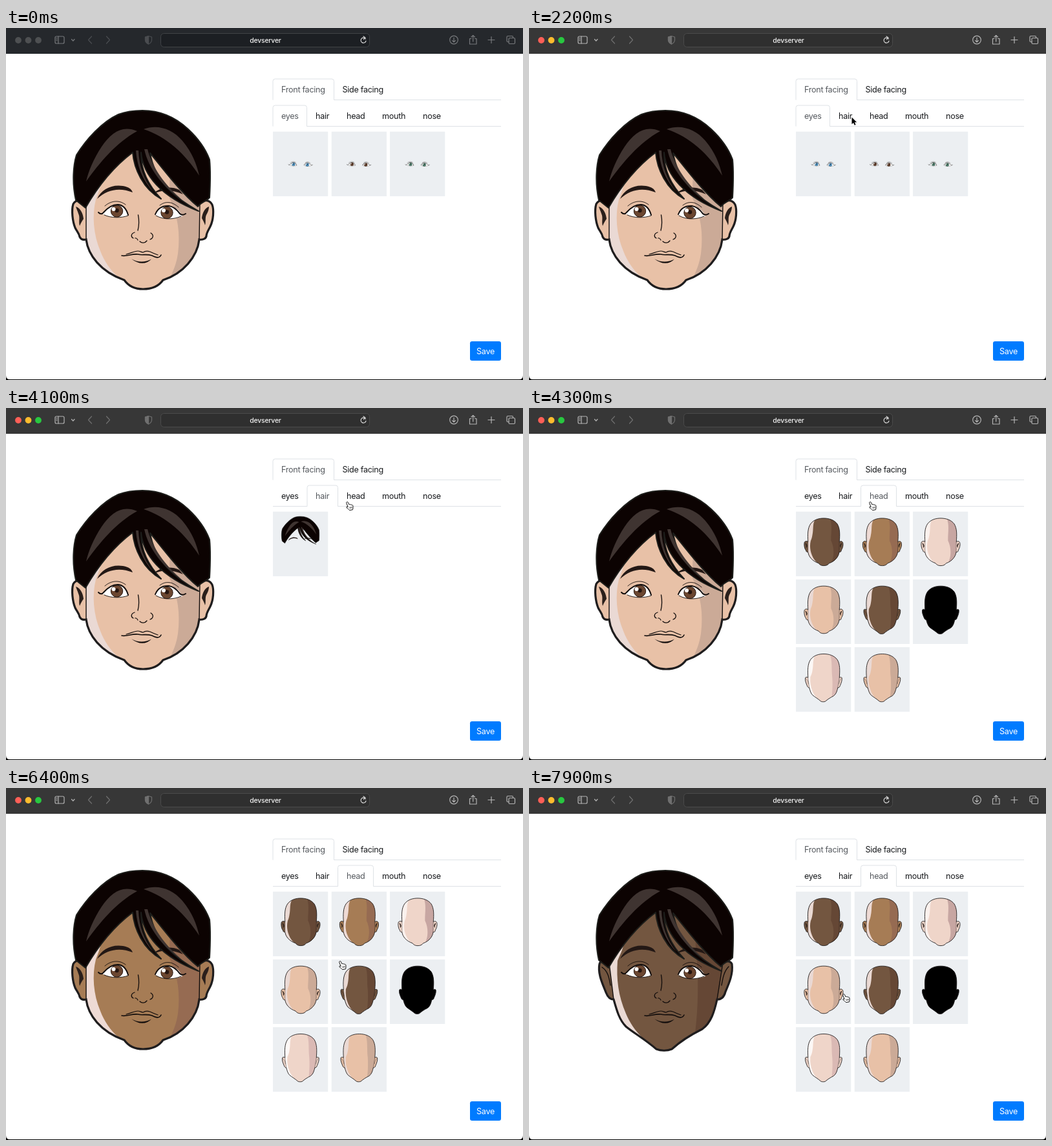
These frames come from a looping animation (800 px wide and 546 px high, 8000 ms). An HTML page:

```html
<!DOCTYPE html>
<html lang="en">
<head>
<meta charset="utf-8">
<title>Avatar editor</title>
<style>
html, body { margin: 0; width: 100%; height: 100%; overflow: hidden; background: #000; }
#stage { display: block; width: 800px; height: 546px; }
text { font: 12.6px Inter, "Liberation Sans", sans-serif; letter-spacing: -.3px; fill: #17191c; }
.on { fill: #55595e; }
.rule { fill: none; stroke: #dee2e6; }
.tab { fill: #fff; stroke: #dee2e6; }
.ink { fill: none; stroke: #120d0c; stroke-linecap: round; stroke-linejoin: round; }
.line { fill: none; stroke: currentColor; stroke-width: 1.2; stroke-linecap: round; stroke-linejoin: round; }

.umber { --skin: #735640; --light: #ead9d3; --shade: #654735; }
.brown { --skin: #a67c55; --light: #eedad4; --shade: #966b52; }
.rose  { --skin: #efd5c9; --light: #fbf1ed; --shade: #c7a6a2; }
.rosy  { --skin: #efd5c9; --light: #fdf8f6; --shade: #dab9b4; }
.tan   { --skin: #e8c1a7; --light: #ead9d4; --shade: #cbaa97; }
.black { --skin: #000; --light: #000; --shade: #000; }

/* Every part shares one 8 s clock; states flip, the pointer moves in 100 ms steps. */
.t { animation: 8s step-end -20ms infinite; }
#chrome { animation-name: chrome; }
#eyesTab { animation-name: eyesTab; }
#hairTab { animation-name: hairTab; }
#headTab { animation-name: headTab; }
#faceTan { animation-name: faceTan; }
#faceBrown { animation-name: faceBrown; }
#faceUmber { animation-name: faceUmber; }
#arrow { animation-name: arrow; }
#hand { animation-name: hand; }
#pointer { animation-name: pointer; }

@keyframes chrome {
  0%  { --bar: #25282c; --field: #1c1f23; --edge: #404346; --a: #4e5052; --b: #4e5052; --c: #4e5052; color: #77797c; }
  25%, 100% { --bar: #373737; --field: #2f2f2f; --edge: #4b4b4b; --a: #ff5f57; --b: #febc2e; --c: #28c840; color: #b4b4b4; }
}
@keyframes eyesTab { 0% { opacity: 1 } 37.5%, 100% { opacity: 0 } }
@keyframes hairTab { 0% { opacity: 0 } 37.5% { opacity: 1 } 53.75%, 100% { opacity: 0 } }
@keyframes headTab { 0% { opacity: 0 } 53.75%, 100% { opacity: 1 } }
@keyframes faceTan { 0% { opacity: 1 } 68.75%, 100% { opacity: 0 } }
@keyframes faceBrown { 0% { opacity: 0 } 68.75% { opacity: 1 } 87.5%, 100% { opacity: 0 } }
@keyframes faceUmber { 0% { opacity: 0 } 87.5%, 100% { opacity: 1 } }
@keyframes arrow { 0% { opacity: 0 } 11.25% { opacity: 1 } 35%, 100% { opacity: 0 } }
@keyframes hand { 0% { opacity: 0 } 35%, 100% { opacity: 1 } }
@keyframes pointer {
  0%     { transform: translate(700px, 430px) }
  11.25% { transform: translate(700px, 430px); animation-timing-function: steps(3) }
  15%    { transform: translate(575px, 215px); animation-timing-function: steps(3) }
  18.75% { transform: translate(520px, 151px); animation-timing-function: steps(3) }
  22.5%  { transform: translate(499px, 138px) }
  33.75% { transform: translate(499px, 138px); animation-timing-function: steps(2) }
  36.25% { transform: translate(482px, 136px) }
  47.5%  { transform: translate(482px, 136px); animation-timing-function: steps(3) }
  51.25% { transform: translate(526px, 145px) }
  62.5%  { transform: translate(526px, 145px); animation-timing-function: steps(3) }
  66.25% { transform: translate(526px, 199px) }
  75%    { transform: translate(526px, 199px); animation-timing-function: steps(4) }
  80%    { transform: translate(515px, 268px); animation-timing-function: steps(4) }
  85%    { transform: translate(514px, 308px) }
  93.75% { transform: translate(514px, 308px); animation-timing-function: steps(4) }
  98.75%, 100% { transform: translate(485px, 319px) }
}
</style>
</head>
<body>
<svg id="stage" viewBox="0 0 800 546">
<defs>
  <path id="round" d="M124 328C127 352 146 378 183 391C190 401 200 405 212 405C226 405 236 401 243 391C274 381 296 355 299 328C304 329 309 327 310 323C310 318 313 314 316 308C321 298 322 282 319 274C315 266 306 266 300 271C303 230 304 196 288 170C270 146 240 138 212 138C184 138 156 146 138 170C121 196 122 230 124 271C118 265 108 266 104 273C101 283 103 300 107 310C110 316 113 318 114 324C116 328 120 329 124 328Z"/>
  <path id="pointed" d="M131 328C136 346 140 360 150 370C162 380 180 390 197 405C204 408 214 408 221 405C232 395 248 384 268 374C282 364 287 346 291 328C298 328 302 324 304 316C310 302 316 288 314 273C312 268 306 268 300 271C303 230 304 196 288 170C270 146 240 138 212 138C184 138 156 146 138 170C121 196 122 230 124 271C116 267 110 268 109 273C106 288 114 304 119 317C122 325 126 328 131 328Z"/>
  <clipPath id="roundClip"><use href="#round"/></clipPath>
  <clipPath id="pointedClip"><use href="#pointed"/></clipPath>

  <g id="headA">
    <use href="#round" fill="var(--skin)"/>
    <g clip-path="url(#roundClip)">
      <path fill="var(--light)" d="M170 138C146 165 157 195 148 235C146 250 141 260 139 266C133 290 135 320 146 346C152 362 162 376 173 386C146 380 128 350 124 328V271C120 215 124 160 170 138Z"/>
      <path fill="var(--shade)" d="M246 138C262 175 252 220 253 264C266 290 270 320 266 350C264 364 260 374 255 385C282 376 296 352 300 328V271C308 200 300 150 246 138Z"/>
    </g>
    <path d="M108 277C116 280 119 288 120 296C118 299 116 302 114 307C112 300 115 294 112 288C111 284 109 281 108 277ZM314 277C308 279 304 286 303 295C305 299 307 302 308 306C310 300 307 294 311 288C313 284 314 281 314 277Z" fill="#2a1f1b"/>
    <path class="ink" stroke-width="1.400" d="M124 271V328M300 271L299 328"/>
    <use href="#round" fill="none" stroke="#1f1d1e" stroke-width="3.200"/>
  </g>
  <g id="headB">
    <use href="#pointed" fill="var(--skin)"/>
    <g clip-path="url(#pointedClip)">
      <path fill="var(--light)" d="M170 138C146 165 157 195 148 235C146 250 140 260 137 268C135 296 138 322 150 350C156 364 164 376 175 387C150 376 138 355 131 328L124 271C120 215 124 160 170 138Z"/>
      <path fill="var(--shade)" d="M246 138C262 175 254 220 260 270C262 300 262 340 257 380C278 372 287 350 291 328L300 271C308 200 300 150 246 138Z"/>
    </g>
    <path class="ink" stroke-width="1.400" d="M113 278C122 284 124 294 126 306M309 277C302 284 300 294 298 306M124 271L131 328M300 271L291 328"/>
    <use href="#pointed" fill="none" stroke="#1f1d1e" stroke-width="3.200"/>
  </g>

  <g id="eyes">
    <path fill="#fff" d="M149 288C157 278 165 274 173 274C181 274 186 280 189 291C178 295 160 295 149 288ZM231 290C236 279 243 276 251 276C261 276 268 282 273 292C262 297 244 298 231 290Z"/>
    <g fill="var(--iris)" stroke="#2a1a14">
      <circle cx="171.500" cy="284" r="9.200"/><circle cx="249" cy="286.500" r="9.200"/>
    </g>
    <g fill="#24140f"><circle cx="171.500" cy="283" r="3.200"/><circle cx="249" cy="285.500" r="3.200"/></g>
    <g fill="#fff"><circle cx="166.500" cy="281" r="3"/><circle cx="244" cy="283" r="3"/></g>
    <path class="ink" stroke-width="2" d="M143 286C146 289 149 289 151 286C159 277 167 273.500 174 274C183 275 187 283 189 290M231 289C235 279 243 275.500 252 276C261 277 266 284 269 288C272 291 275 290 278 288"/>
    <path class="ink" stroke-width=".9" d="M152 290C163 295 178 295 189 291M232 291C244 298 260 297 271 292M153 276C162 268 175 266 185 274M238 275C247 268 257 269 267 278"/>
  </g>
  <g id="features">
    <path class="ink" stroke-width="1.300" d="M204.500 290C206.500 300 206 306 204 314M199 317C193 319 193 324 197 326M200 326C202 325 203 327 204 329M207 331C210 334 215 334 218 330M224 318C229 321 228 326 223 328"/>
    <path class="ink" stroke-width="1.200" d="M186 351C192 350 198 346 204 346C207 346 210 348 212 348C215 346 220 346 223 347C229 350 232 351 235 352"/>
    <path class="ink" stroke-width="1.600" d="M179 353C186 355 194 350 204 351C211 353 217 350 226 353C232 356 237 358 240 352"/>
    <path fill="#120d0c" d="M194 358C204 364 215 364 225 358.500C217 367 205 367 194 358Z"/>
  </g>

  <g id="hair">
    <path fill="#231815" d="M141 265C148 249 168 240 188 247C193 249 195 252 196 255C176 247 157 250 141 265ZM228 257C236 248 254 244 268 251L274 258C257 250 242 251 228 257Z"/>
    <path fill="#0c0302" stroke="#1c1d1a" stroke-width="2" stroke-linejoin="round" d="M123 279L108 267C102 240 104 213 109 197C124 173 148 146 174 134C187 129 200 128 211 128C240 128 262 138 282 157C297 171 309 188 315 204C317 225 316 245 315 263C310 269 303 269 297 277C268 253 238 212 223 194C230 238 262 264 298 284C240 262 212 228 209 193C208 224 224 248 240 265C212 250 198 218 196 193C164 217 142 246 123 279Z"/>
    <g fill="#3f3431">
      <path d="M203 160C180 150 163 162 148 184C135 204 128 221 124 238C145 209 170 178 203 160Z"/>
      <path d="M213 157C234 149 257 156 273 175C288 193 295 211 299 229C278 196 248 168 213 157Z"/>
      <path d="M201 190C203 218 214 240 228 254C213 234 206 214 205 190ZM214 188C220 218 244 248 272 266C246 244 226 216 219 188Z"/>
    </g>
  </g>
  <g id="front">
    <use href="#eyes" style="--iris:#6b4630"/><use href="#features"/><use href="#hair"/>
  </g>

  <symbol id="tileA" viewBox="56 100 310 364"><rect id="card" x="56" y="100" width="310" height="364" fill="#eceff2"/><use href="#headA"/></symbol>
  <symbol id="tileB" viewBox="56 100 310 364"><use href="#card"/><use href="#headB"/></symbol>
  <symbol id="tileEyes" viewBox="56 100 310 364"><use href="#card"/><use href="#eyes"/></symbol>
  <symbol id="tileHair" viewBox="56 100 310 364"><use href="#card"/><use href="#hair"/></symbol>
</defs>

<rect width="800" height="546"/>
<path fill="#fff" d="M0 40H800V539Q800 545 794 545H6Q0 545 0 539Z"/>

<g id="chrome" class="t">
  <rect width="800" height="40" fill="var(--bar)"/>
  <circle cx="19" cy="19" r="4.900" fill="var(--a)"/>
  <circle cx="34.500" cy="19" r="4.900" fill="var(--b)"/>
  <circle cx="50" cy="19" r="4.900" fill="var(--c)"/>
  <rect x="239.500" y="8.500" width="323" height="21" rx="5" fill="var(--field)" stroke="var(--edge)"/>
  <g class="line">
    <rect x="76" y="13" width="14" height="11" rx="2"/>
    <path d="M81 13V24M78 15.500H79M78 17.500H79M78 19.500H79M101.500 17.500L103.800 20L106 17.500"/>
    <g opacity=".45"><path d="M132.500 13L127.500 18.500L132.500 24M155.500 13L160.500 18.500L155.500 24"/></g>
    <g opacity=".45"><path d="M220.500 12.500L225.500 14V19Q225 23 220.500 25Q216 23 215.500 19V14Z"/><path fill="currentColor" d="M220.500 12.500V25Q216 23 215.500 19V14Z"/></g>
    <circle cx="693" cy="18.500" r="6.300"/>
    <path d="M693 15V21.500M690.500 19.300L693 21.800L695.500 19.300M720 16.500H717.500V25H728V16.500H725.500M722.700 21V11.500M720 14L722.700 11.300L725.400 14M746 18.500H756M751 13.500V23.500"/>
    <path d="M778 21.500H776.500Q775 21.500 775 20V14Q775 12.500 776.500 12.500H783Q784.500 12.500 784.500 14V15.500"/>
    <rect x="778" y="15.500" width="9.500" height="9" rx="1.500"/>
  </g>
  <path class="line" style="color:#d6d6d6" d="M556.500 17A4 4 0 1 0 557 20M553 13L556 15L553.500 17.500"/>
  <text x="401.500" y="23" text-anchor="middle" style="font-size:10.4px;font-weight:500;letter-spacing:-.2px;fill:#f2f2f2">devserver</text>
</g>

<path class="rule" d="M413 111.500H766M413 152.500H766"/>
<path class="tab" d="M413 111.500V82.500Q413 79 416.500 79H504Q507.500 79 507.500 82.500V111.500"/>
<path stroke="#fff" stroke-width="1.500" d="M413.600 111.500H507"/>
<text class="on" x="426" y="100">Front facing</text>
<text x="520.500" y="100">Side facing</text>
<text x="426" y="141">eyes</text>
<text x="479" y="141">hair</text>
<text x="527" y="141">head</text>
<text x="582" y="141">mouth</text>
<text x="645" y="141">nose</text>

<g id="eyesTab" class="t">
  <path class="tab" d="M413 152.500V123.500Q413 120 416.500 120H462Q465.500 120 465.500 123.500V152.500"/>
  <path stroke="#fff" stroke-width="1.500" d="M413.600 152.500H465"/>
  <text class="on" x="426" y="141">eyes</text>
  <use href="#tileEyes" x="413" y="160.500" width="85.500" height="100.400" style="--iris:#4aa3df"/>
  <use href="#tileEyes" x="503.500" y="160.500" width="85.500" height="100.400" style="--iris:#6b4630"/>
  <use href="#tileEyes" x="594" y="160.500" width="85.500" height="100.400" style="--iris:#4f8f7c"/>
</g>
<g id="hairTab" class="t" opacity="0">
  <path class="tab" d="M466 152.500V123.500Q466 120 469.500 120H510Q513.500 120 513.500 123.500V152.500"/>
  <path stroke="#fff" stroke-width="1.500" d="M466.600 152.500H513"/>
  <text class="on" x="479" y="141">hair</text>
  <use href="#tileHair" x="413" y="160.500" width="85.500" height="100.400"/>
</g>
<g id="headTab" class="t" opacity="0">
  <path class="tab" d="M513.500 152.500V123.500Q513.500 120 517 120H565Q568.500 120 568.500 123.500V152.500"/>
  <path stroke="#fff" stroke-width="1.500" d="M514.100 152.500H568"/>
  <text class="on" x="527" y="141">head</text>
  <use class="umber" href="#tileA" x="413" y="160.500" width="85.500" height="100.400"/>
  <use class="brown" href="#tileA" x="503.500" y="160.500" width="85.500" height="100.400"/>
  <use class="rose" href="#tileA" x="594" y="160.500" width="85.500" height="100.400"/>
  <use class="tan" href="#tileA" x="413" y="265.700" width="85.500" height="100.400"/>
  <use class="umber" href="#tileB" x="503.500" y="265.700" width="85.500" height="100.400"/>
  <use class="black" href="#tileB" x="594" y="265.700" width="85.500" height="100.400"/>
  <use class="rosy" href="#tileB" x="413" y="371" width="85.500" height="100.400"/>
  <use class="tan" href="#tileB" x="503.500" y="371" width="85.500" height="100.400"/>
</g>

<g id="faceTan" class="t tan"><use href="#headA"/></g>
<g id="faceBrown" class="t brown" opacity="0"><use href="#headA"/></g>
<g id="faceUmber" class="t umber" opacity="0"><use href="#headB"/></g>
<use href="#front"/>

<rect x="718" y="486" width="48" height="30" rx="3.200" fill="#007bff"/>
<text x="742" y="506" text-anchor="middle" style="fill:#fff">Save</text>

<g id="pointer" class="t">
  <path id="arrow" class="t" opacity="0" stroke="#fff" stroke-width="1.400" paint-order="stroke" d="M.5 .5V11.300L3 9L4.800 12.800L6.600 12L4.900 8.300H8.200Z"/>
  <g id="hand" class="t" opacity="0" fill="#fff" stroke="#111" stroke-linejoin="round">
    <path d="M1.200 1C2.200 .2 3.200 .8 3.600 2L5 5C5.500 4.300 6.600 4.300 7 5.200C7.600 4.500 8.700 4.600 9 5.600C9.800 5.200 10.600 5.600 10.800 6.600C11.200 8.600 11.200 10.500 10.400 12.800L5.500 13.600C4.500 12 2.600 11 1 9.600C.2 8.600 1.200 7.800 2.200 8.200L3.200 8.600L.8 2.600C.5 1.900 .7 1.300 1.200 1Z"/>
    <path fill="none" stroke-width=".7" d="M5.600 8.500L6.300 11M7.300 8.300L7.800 10.700M9 8L9.300 10.400"/>
  </g>
</g>
</svg>
</body>
</html>
```
